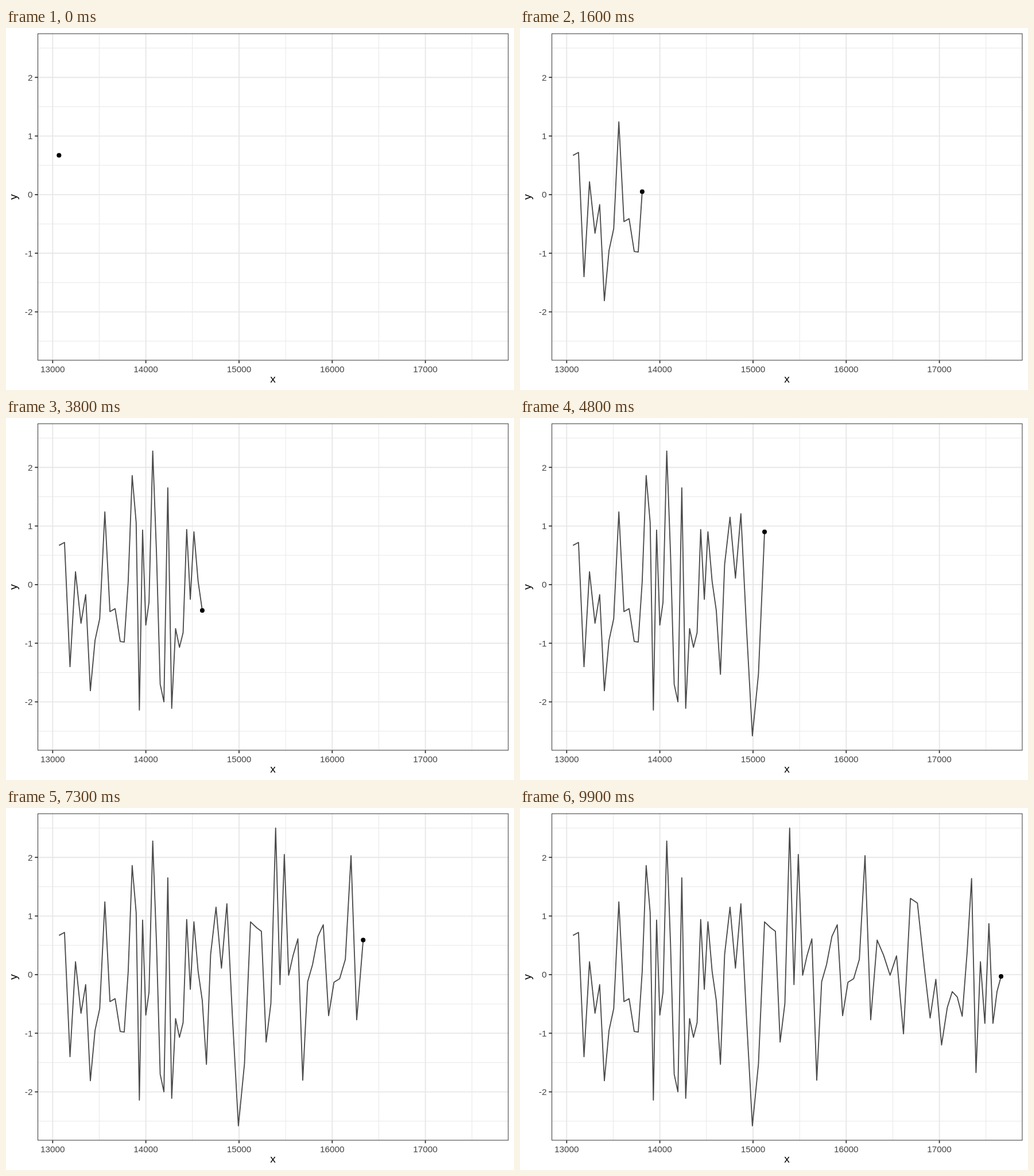
An HTML page that plays this animation: 885x632 px, repeating every 10000 ms.

```html
<!DOCTYPE html>
<html lang="en">
<head>
<meta charset="utf-8">
<title>Line reveal</title>
<style>
  html, body { margin: 0; width: 100%; height: 100%; overflow: hidden; background: #fff; }
  svg { display: block; }
  text { font-family: "Liberation Sans", Arial, sans-serif; font-size: 15.3px; fill: #434343; }
  .title { font-size: 19.1px; fill: #000; text-anchor: middle; }
  .major { stroke: #e7e7e7; stroke-width: 1.85; }
  .minor { stroke: #e7e7e7; stroke-width: 0.93; }
  .tick { stroke: #333; stroke-width: 1.85; }
</style>
</head>
<body>
<svg width="885" height="632" viewBox="0 0 885 632">
  <g id="minor" class="minor"></g>
  <g id="major" class="major"></g>
  <path id="trail" fill="none" stroke="#4a4a4a" stroke-width="1.85" stroke-linejoin="round"/>
  <circle id="dot" r="4"/>
  <rect x="55.55" y="10" width="819.4" height="570" fill="none" stroke="#333"/>
  <g id="ticks" class="tick"></g>
  <g id="labels"></g>
  <text class="title" x="465" y="618.6">x</text>
  <text class="title" transform="translate(19 295) rotate(-90)">y</text>
</svg>
<script>
const panel = { left: 55.1, right: 875.4, top: 9.5, bottom: 580.4 };
const FRAMES = 100, FRAME_MS = 100, X_ORIGIN = 13000;
const byId = id => document.getElementById(id);
const lerp = (a, b, t) => a + (b - a) * t;
const toX = value => 81.3 + (value - X_ORIGIN) * 0.16233;
const toY = value => 290.9 - value * 102.34;

// Offsets from X_ORIGIN at every KNOT_STEP-th sample; samples between are evenly spaced
const KNOT_STEP = 4;
const knots = [
  68, 304, 505, 725, 896, 1034, 1194, 1361, 1516, 1695, 1928, 2189,
  2393, 2579, 2789, 3019, 3263, 3540, 3839, 4085, 4298, 4488, 4662
];
const samples = [
  .67, .72, -1.4, .22, -.66, -.17, -1.81, -.95, -.58, 1.24,
  -.46, -.41, -.97, -.98, .05, 1.86, 1.06, -2.14, .93, -.69,
  -.3, 2.28, .55, -1.7, -2, 1.65, -2.11, -.75, -1.07, -.82,
  .94, -.25, .9, .06, -.44, -1.53, .34, 1.15, .11, 1.21,
  -.68, -2.58, -1.52, .9, .8, .74, -1.15, -.49, 2.5, -.17,
  2.05, -.01, .32, .61, -1.8, -.12, .17, .65, .85, -.7,
  -.13, -.07, .26, 2.03, -.77, .59, .33, -.01, .32, -1.01,
  1.3, 1.22, .11, -.74, -.08, -1.2, -.56, -.29, -.38, -.71,
  .39, 1.64, -1.67, .22, -.83, .87, -.83, -.29, -.03
];

function roundHalfEven(v) {
  const low = Math.floor(v);
  return v - low === 0.5 ? low + low % 2 : Math.round(v);
}

function offsetAt(i) {
  const k = Math.floor(i / KNOT_STEP);
  const part = i % KNOT_STEP / KNOT_STEP;
  return part ? lerp(knots[k], knots[k + 1], part) : knots[k];
}

const points = samples.map((value, i) => ({
  x: toX(X_ORIGIN + offsetAt(i)),
  y: toY(value),
  frame: roundHalfEven(i * (FRAMES - 1) / (samples.length - 1))
}));

function add(parent, tag, attrs, content = "") {
  const el = document.createElementNS("http://www.w3.org/2000/svg", tag);
  for (const key in attrs) el.setAttribute(key, attrs[key]);
  el.textContent = content;
  byId(parent).appendChild(el);
}
const line = (parent, x1, y1, x2, y2) => add(parent, "line", { x1, y1, x2, y2 });

function drawAxes() {
  const { left, right, top, bottom } = panel;
  for (let value = 13000; value <= 17500; value += 500) {
    const x = toX(value), major = value % 1000 === 0;
    line(major ? "major" : "minor", x, top, x, bottom);
    if (!major) continue;
    line("ticks", x, bottom, x, bottom + 4.8);
    add("labels", "text", { x, y: 600.5, "text-anchor": "middle" }, value);
  }
  for (let value = -2.5; value <= 2.5; value += 0.5) {
    const y = toY(value), major = Number.isInteger(value);
    line(major ? "major" : "minor", left, y, right, y);
    if (!major) continue;
    line("ticks", left - 4.8, y, left, y);
    add("labels", "text", { x: 46.4, y: y + 5.5, "text-anchor": "end" }, value);
  }
}

function render(ms) {
  const frame = Math.floor(ms / FRAME_MS) % FRAMES;
  const shown = points.filter(p => p.frame <= frame);
  const last = shown[shown.length - 1];
  const next = points[shown.length] || last;
  const part = (frame - last.frame) / (next.frame - last.frame || 1);
  const head = { x: lerp(last.x, next.x, part), y: lerp(last.y, next.y, part) };

  const path = [...shown, head].map(p => `${p.x} ${p.y}`).join("L");
  byId("trail").setAttribute("d", "M" + path);
  byId("dot").setAttribute("cx", head.x);
  byId("dot").setAttribute("cy", head.y);
}

drawAxes();
const start = performance.now();
function tick() {
  render(performance.now() - start);
  requestAnimationFrame(tick);
}
tick();
</script>
</body>
</html>
```
